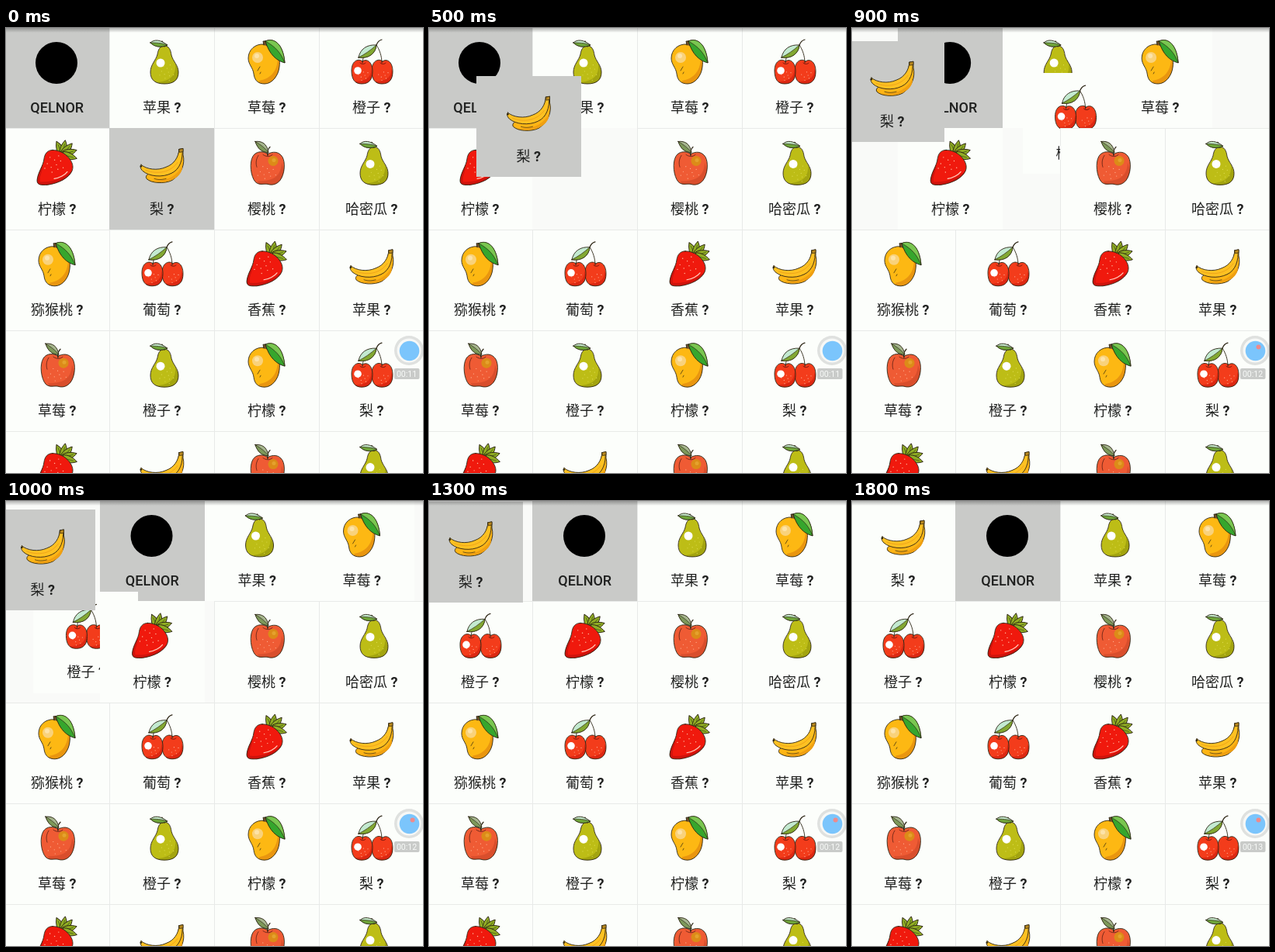
Write an HTML page with a canvas that moves like this. It is 537 by 574 pixels and loops after 1.9 s.

```html
<!DOCTYPE html>
<html lang="zh">
<head>
<meta charset="utf-8">
<style>
html, body { margin: 0; width: 100%; height: 100%; overflow: hidden; background: #fcfefb; }
canvas { display: block; }
</style>
</head>
<body>
<canvas id="stage" width="537" height="574"></canvas>
<script>
const ctx = document.getElementById('stage').getContext('2d');
const LOOP = 1900, STEP = 100;
const COL = 135, ROW = 130.4, LEFT = -2, TOP = -1.2;
const INK = '#2b2413', PAPER = '#fcfefb', GRAY = '#c9cac8', LINE = '#e8eae8', EMPTY = '#f9faf8';
const DRAGGED = 5, DROP_TIME = 1400;

function shape(d, fill, stroke = INK, width = 0.9) {
  const path = new Path2D(d);
  if (fill) { ctx.fillStyle = fill; ctx.fill(path); }
  if (stroke) { ctx.strokeStyle = stroke; ctx.lineWidth = width; ctx.stroke(path); }
}

function dot(x, y, r, fill) {
  ctx.fillStyle = fill;
  ctx.beginPath();
  ctx.arc(x, y, r, 0, Math.PI * 2);
  ctx.fill();
}

// Evenly scattered specks inside an ellipse
function specks(x, y, rx, ry, count, fill, size = 0.7) {
  for (let i = 0; i < count; i++) {
    const r = Math.sqrt((i + 0.5) / count), a = i * 2.4;
    dot(x + rx * r * Math.cos(a), y + ry * r * Math.sin(a), size, fill);
  }
}

// Fills a body, adds shade clipped to it, then outlines it
function body(d, fill, shadeD, shade) {
  const path = new Path2D(d);
  ctx.save();
  ctx.clip(path);
  shape(d, fill, null);
  shape(shadeD, shade, null);
  ctx.restore();
  shape(d, null);
}

const icons = {
  logo() { dot(-1, 1, 27, '#000'); },

  pear() {
    body('M3-21C-3-21-5-16-6-10C-8-2-15 3-15 13C-15 23-9 28 3 28C15 28 21 23 21 13C21 4 14-1 12-9C11-16 9-21 3-21Z',
      '#bdbd16', 'M17 2C18 14 14 24-6 26L4 32L26 24Z', '#a3a40f');
    specks(6, 13, 11, 11, 12, '#dedc52', 0.6);
    dot(-2, 1, 5.5, '#fff');
    shape('M3-20C2-23 1-25 0-27', null, INK, 1.3);
    shape('M-15-25C-10-30-2-29 7-22C-3-18-10-20-15-25Z', '#c4e9ca');
    shape('M-15-25C-8-25-1-25 7-22C-3-18-10-20-15-25Z', '#6fa53a', INK, 0.7);
  },

  mango() {
    body('M-4-23C-15-24-24-16-24-5C-24 3-18 7-17 15C-16 24-11 28-3 28C7 28 15 17 16 6C18-8 13-22-4-23Z',
      '#fdb813', 'M14-6C14 9 7 21-10 24L-12 32L24 24Z', '#e9960f');
    dot(-12, -6, 7, '#f9d27b');
    dot(-13, -8, 3, '#fde3a8');
    shape('M-9 6L-12 11M-8 13L-9 15', null, INK, 0.7);
    shape('M-4-22L-5-27L-1-27L0-21', '#715129');
    shape('M-2-27C8-32 21-25 23 1C12-2 3-10-2-27Z', '#36a62d');
    shape('M-2-27C8-32 21-25 23 1C18-12 11-20-2-27Z', '#79c650', INK, 0.7);
  },

  cherry() {
    const round = 'M0-12C-4-16-14-14-14 0C-14 11-10 17-1 17C9 17 13 11 13 1C13-12 5-16 0-12Z';
    for (const x of [14, -12]) {
      ctx.save();
      ctx.translate(x, 11);
      body(round, '#f33c1b', 'M11-3C12 9 4 14-11 14L-6 22L18 18Z', '#dc2812');
      specks(1, 6, 8, 7, 7, '#ffb5a0', 0.6);
      shape('M-3-10C-1-8 2-8 4-10', null, '#6f140c', 1);
      ctx.restore();
    }
    dot(-18, 11, 4.8, '#fff');
    shape('M-12 1C-12-7-7-16 6-22C10-16 13-8 13 1', null, INK, 0.9);
    shape('M6-22C7-25 9-28 13-29', null, INK, 1.2);
    shape('M-17-6C-15-17-6-23 6-22C5-11-4-4-17-6Z', '#c3ead0');
    shape('M-17-6C-9-10-2-15 6-22C5-11-4-4-17-6Z', '#82a832', INK, 0.7);
  },

  strawberry() {
    // Narrow sepals fan out from the crown
    for (const angle of [-115, -80, -50, -18, 15]) {
      ctx.save();
      ctx.translate(7, -11);
      ctx.rotate(angle * Math.PI / 180);
      shape('M0-4C6-6 13-4 19 0C13 4 6 5 0 4Z', '#91ad24');
      shape('M4 0L14 0', null, '#3f551a', 0.7);
      ctx.restore();
    }
    body('M-6-17C-13-17-16-12-17-6C-18 4-25 11-26 22C-26 29-20 28-13 28C2 26 15 19 19 10C22 3 18-4 13-9C8-14 1-17-6-17Z',
      '#f0190d', 'M-19-2C-17 11-24 15-22 24C-6 25 9 20 22 7L18 32L-32 34Z', '#cf130c');
    specks(-4, 2, 14, 13, 11, '#ffc1a5', 0.7);
    shape('M-4 20C3 19 10 15 13 11', null, '#ffd5c6', 1.1);
  },

  banana() {
    shape('M22-18L27-19L27-11C30 1 25 14 13 22C3 27-14 26-20 20C-22 17-19 14-16 13C2 18 20 8 22-18Z', '#ffb515');
    shape('M-14 22C5 24 19 17 26 3C27 14 16 23 2 24C-4 25-10 24-14 22Z', '#f0a011', null);
    shape('M-27 2C-20 8-6 10 5 5C16 1 21-8 22-18L26-18C27-5 23 8 12 13C0 19-17 17-25 10C-28 7-29 3-27 2Z', '#ffc122');
    shape('M-21 9C-6 15 11 12 20-1', null, '#eda51b', 1);
    shape('M-10 20C-4 22 1 21 5 20', null, INK, 0.7);
    shape('M22-18L27-19L27-15L23-14Z', '#b7871f', INK, 0.7);
    dot(-27, 4, 1.2, INK);
  },

  apple() {
    body('M1-12C-4-16-14-16-18-9C-23-1-21 17-15 24C-10 29-4 26 1 27C7 29 13 27 17 22C23 14 24-1 20-8C15-16 7-15 1-12Z',
      '#ef5b34', 'M19-1C18 15 11 23-12 23L-8 34L28 28Z', '#d94e2c');
    dot(8, -3, 6.5, '#dc8b18');
    dot(9, -4, 2.5, '#e5a22d');
    specks(0, 12, 13, 10, 10, '#ffb595', 0.6);
    shape('M-11-10C-15-4-14 2-13 5M-5-11C-1-8 4-8 7-11', null, '#6b2618', 0.9);
    shape('M1-10C0-15 1-18 4-21', null, INK, 1.3);
    shape('M-15-28C-6-29 0-25 2-14C-7-14-12-19-15-28Z', '#a6b68e');
    shape('M-15-28C-7-23-3-20 2-14C-7-14-12-19-15-28Z', '#7d995a', INK, 0.7);
  }
};

const fruits = ['pear', 'mango', 'cherry', 'strawberry', 'banana', 'apple'];
const labels = ['QELNOR', '苹果', '草莓', '橙子', '柠檬', '梨', '樱桃', '哈密瓜', '猕猴桃', '葡萄',
  '香蕉', '苹果', '草莓', '橙子', '柠檬', '梨', '香蕉', '葡萄', '樱桃', '草莓'];
const items = labels.map((label, i) => ({ label, icon: i ? fruits[(i - 1) % 6] : 'logo' }));

// time, left, top of the dragged cell
const drag = [[0, 133, 129.2], [100, 133, 129], [300, 122, 110], [400, 101, 87], [500, 60.5, 62],
  [600, 31, 46], [700, 7.5, 32], [900, -16, 17], [1100, -25, 4.4], [1200, -26, 2.5],
  [1300, -14, 0.6], [DROP_TIME, LEFT, TOP]];

const mix = (a, b, p) => a + (b - a) * p;
const slot = i => [LEFT + COL * (i % 4), TOP + ROW * Math.floor(i / 4)];

function dragPosition(t) {
  const k = drag.findIndex(key => key[0] > t);
  if (k < 0) return slot(0);
  const a = drag[k - 1], b = drag[k], p = (t - a[0]) / (b[0] - a[0]);
  return [mix(a[1], b[1], p), mix(a[2], b[2], p)];
}

function shiftProgress(t) {
  const p = Math.min(1, Math.max(0, (t - 759) / 300));
  return (1 - Math.cos(Math.PI * p)) / 2;
}

function drawLabel(label, cx, y, latin) {
  const cjk = '400 18px "Noto Sans CJK SC", "Noto Sans CJK", sans-serif';
  const roman = '500 18px Roboto, sans-serif';
  const parts = latin ? [[label, roman]] : [[label, cjk], [' ?', '700 18px Roboto, sans-serif']];
  const widths = parts.map(([text, font]) => {
    ctx.font = font;
    return ctx.measureText(text).width;
  });
  let x = cx - widths.reduce((a, b) => a + b) / 2;
  ctx.fillStyle = '#202120';
  parts.forEach(([text, font], i) => {
    ctx.font = font;
    ctx.fillText(text, x, y);
    x += widths[i];
  });
}

function drawCell(item, [x, y], held, resting) {
  const left = Math.round(x), top = Math.round(y);
  const width = Math.round(x + COL) - left, height = Math.round(y + ROW) - top;
  const gray = held || item.icon === 'logo';
  ctx.fillStyle = gray ? GRAY : PAPER;
  ctx.fillRect(left, top, width, height);
  if (resting && !gray) {
    ctx.fillStyle = LINE;
    ctx.fillRect(left, top, 1, height);
    ctx.fillRect(left, top, width, 1);
  }
  ctx.save();
  ctx.translate(x + 68, y + 45.2);
  ctx.lineJoin = ctx.lineCap = 'round';
  icons[item.icon]();
  ctx.restore();
  drawLabel(item.label, x + 67.7, y + 110.3, item.icon === 'logo');
}

function drawRecorder(t) {
  dot(519, 416, 19, '#dfe1df');
  dot(519, 416, 15.5, '#f7f8f6');
  dot(519.5, 416.5, 12.8, '#7bc5fc');
  if (t >= 800) dot(523.5, 411.5, 3, '#ee8a8b');
  ctx.fillStyle = '#c9cbc9';
  ctx.beginPath();
  ctx.roundRect(500, 439, 32.5, 14, 2);
  ctx.fill();
  ctx.fillStyle = '#f8faf8';
  ctx.font = '400 10.5px Roboto, sans-serif';
  ctx.textAlign = 'center';
  ctx.fillText('00:' + (11 + (t >= 800) + (t >= 1800)), 516, 450);
  ctx.textAlign = 'left';
}

function draw(t) {
  ctx.fillStyle = EMPTY;
  ctx.fillRect(0, 0, 537, 574);
  const p = shiftProgress(t);
  const dropped = t >= DROP_TIME;
  items.forEach((item, i) => {
    if (i === DRAGGED) return;
    const from = slot(i), to = slot(i < DRAGGED ? i + 1 : i);
    const moving = i < DRAGGED && p > 0 && p < 1;
    drawCell(item, [mix(from[0], to[0], p), mix(from[1], to[1], p)], false, !moving);
  });
  drawCell(items[DRAGGED], dragPosition(t), !dropped, dropped);

  const shadow = ctx.createLinearGradient(0, 0, 0, 6);
  shadow.addColorStop(0, 'rgba(70,70,70,.4)');
  shadow.addColorStop(1, 'rgba(70,70,70,0)');
  ctx.fillStyle = shadow;
  ctx.fillRect(0, 0, 537, 6);
  drawRecorder(t);
}

const start = performance.now();
function tick() {
  const t = (performance.now() - start) % LOOP;
  draw(Math.floor(t / STEP) * STEP);
  requestAnimationFrame(tick);
}
tick();
</script>
</body>
</html>
```
